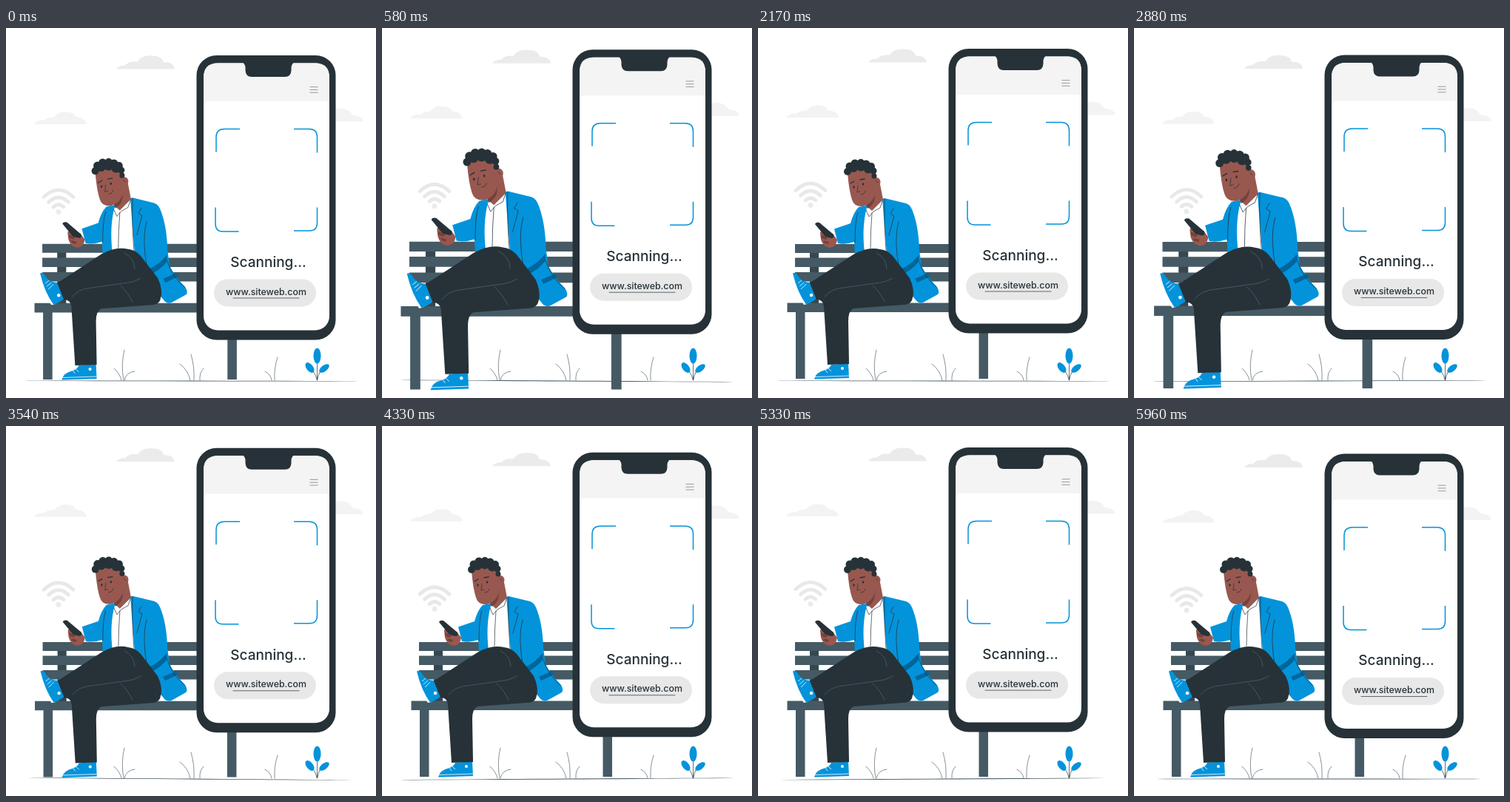
Recreate the animation shown at these times as an HTML page. Size 500x500 px, loop 6000 ms.

```html
<!DOCTYPE html>
<html lang="en">
<head>
<meta charset="utf-8">
<title>Scanning</title>
<style>
  html, body { margin: 0; width: 100%; height: 100%; overflow: hidden; background: #fff; }
  svg { display: block; width: 100%; height: 100%; }
  text { font-family: Inter, "Open Sans", sans-serif; font-weight: 500; fill: #263238; text-anchor: middle; }
  .dark { fill: #263238; }
  .blue { fill: #0393db; }
  .navy { fill: #01669b; }
  .bench { fill: #455a64; }
  .post { fill: #37474f; }
  .skin { fill: #985850; }
  .shade { fill: #74423a; }
  .white { fill: #fff; }
  .pale { fill: #ebebeb; }
  .faint { fill: #f3f3f3; }
  .line, .grass, .fold { fill: none; stroke: #263238; stroke-width: .7; stroke-linecap: round; }
  .grass { stroke: #56646b; }
  .fold { stroke: #56646b; }
</style>
</head>
<body>
<svg viewBox="0 0 500 500">
  <!-- sky -->
  <g class="float">
    <path class="pale" d="M149 56Q152 51 161 51Q166 45 178 46Q183 37 197 38Q211 38 213 47Q226 46 228 56Z"/>
    <g class="faint">
      <path d="M38 130.500Q41 125 52 125Q56 121 65 121Q71 113 82 114Q92 114 95 121Q107 121 109 130.500Z"/>
      <path d="M425 127Q428 121 437 119Q442 109 453 109Q464 110 468 118Q481 119 483 127Z"/>
    </g>
    <path d="M51 229Q71 210 91 229M57.500 236Q71 223 84.500 236M64 242.500Q71 236 78 242.500"
      fill="none" stroke="#e8e8e8" stroke-width="4.6" stroke-linecap="round"/>
    <circle class="pale" cx="71" cy="249" r="3.500"/>
  </g>

  <!-- ground -->
  <ellipse id="floor" cx="250" cy="477" rx="225" ry=".45" fill="#455a64"/>
  <g class="grass">
    <path d="M160 435Q155 455 159 476M146 460Q154 467 156 476M174 464Q162 465 160 476"/>
    <path d="M250 441Q255 458 254 476M235 454Q246 462 249 476M267 460Q261 466 262 476"/>
    <path d="M367 445Q362 460 363 476M350 464Q358 468 359 476"/>
  </g>
  <path class="line" d="M420.500 445V476M411 460Q418 465 420 475M430 459Q422 464 421 475"/>
  <g class="blue">
    <ellipse cx="420.500" cy="443" rx="5" ry="10.500"/>
    <ellipse cx="410.500" cy="459" rx="4.500" ry="8" transform="rotate(-38 410.500 459)"/>
    <ellipse cx="430" cy="460" rx="4" ry="8" transform="rotate(52 430 460)"/>
  </g>

  <!-- bench and sitter -->
  <g id="sitter">
    <path class="post" d="M70 298h12v78h-12zM297 298h12v78h-12z"/>
    <path class="bench" d="M50 292H316v12H50zM50 310.500H316v12.500H50zM50 330H316v12.500H50z"/>
    <path class="bench" d="M39.500 371.500H325v12.500H39.500zM51 384h12.500v90h-12.500zM298.500 384h12.500v90h-12.500z"/>

    <!-- jacket and shirt -->
    <path class="blue" d="M146 240L136 242Q129 249 125 264L103 271.500L108 291Q118 293 130 289L131 306L160 312L192 345L212 366Q216 373 223 371L243 360Q246 357 242 350Q229 337 221 322L218 300Q217 266 208 245Q205 237 196 236L171 230Z"/>
    <path class="white" d="M147 243L168 230Q171 270 174 304L144 304Q140 268 147 243Z"/>
    <path class="line" d="M154 250Q152 275 152 299M146 246L150 255L156 248L165 243L169 231"/>
    <path class="line" d="M171 231Q170 265 173 301M183 244L179 251L184 254L177 280M135 249Q131 260 131 290M190 262Q183 285 191 327"/>
    <path class="navy" d="M191 327Q207 320 217 307L218 315Q208 327 195 333Z"/>
    <path class="navy" d="M212 339L230 331L232 336L215 344Z"/>
    <path class="line" d="M218 316Q224 336 241 350"/>

    <!-- head -->
    <path class="skin" d="M145 228L147 241L154 247L169 232L164 206L152 206Z"/>
    <path class="shade" d="M146 239Q155 235 158 225Q159 238 148 244Z"/>
    <path class="skin" d="M121 196Q123 220 127 232Q130 242 142 241Q154 238 158 224L157 188Q135 182 121 196Z"/>
    <ellipse class="skin" cx="160" cy="208" rx="5.500" ry="6"/>
    <g class="dark" id="hair"></g>
    <g class="dark">
      <ellipse cx="129.500" cy="215" rx="1.200" ry="1.700"/>
      <ellipse cx="142" cy="211" rx="1.200" ry="1.700"/>
    </g>
    <path class="line" d="M125 210L130 207M138 205L144 204" style="stroke-width: 1.300"/>
    <path class="line" d="M135 213L134 222L138 221M139 225Q144 225 145 220M159 206L162 209"/>

    <!-- hand and handset -->
    <path class="skin" d="M84 277Q84 273 90 275L101 278L107 286Q106 296 97 297Q88 296 85 286Z"/>
    <path class="dark" d="M77 265Q78 262 83 263L102 279Q104 284 99 284L91 282Z"/>
    <path class="shade" d="M85 279L94 283L92 286L86 284ZM88 287L96 289L95 292L90 291Z"/>

    <!-- far shoe -->
    <path class="white" d="M43.500 333L48 331L67 373L62 374Q49 357 43.500 333Z"/>
    <path class="blue" d="M47 331.500Q51 329 54 335Q60 344 71 344L81 364Q75 370 65 373.500Q53 357 47 331.500Z"/>
    <path d="M54 345L59 341M56 349L62 344M58 353L65 346" fill="none" stroke="#fff" stroke-width=".8"/>
    <circle class="white" cx="72" cy="361" r="2.200"/>

    <!-- near shoe -->
    <path class="blue" d="M99 455L122 453L123 473L76 474.500Q78 465 91 462Q97 460 99 455Z"/>
    <path d="M91 462L94 466M95 460L99 464M77 471.500L123 470" fill="none" stroke="#fff" stroke-width=".8"/>
    <circle class="white" cx="114" cy="460" r="2"/>

    <!-- trousers -->
    <path class="dark" d="M70 344.500L129 306Q148 295 165 299Q175 300 182 308L205 338Q213 355 208 368Q205 374 196 374L129 379Q122 382 122 396L123 454L94 455L89 376Q88 367 79 367Z"/>
    <path class="fold" d="M90 363Q99 352 115 351L158 345Q172 344 182 338M160 304Q174 311 174 325M155 348Q165 357 171 370"/>
  </g>

  <!-- handset on the right -->
  <g class="float">
    <rect class="dark" x="257.500" y="37.500" width="188" height="384.500" rx="27"/>
    <rect class="white" x="267" y="48" width="170" height="361" rx="19"/>
    <path d="M267 99.500V67Q267 48 286 48H418Q437 48 437 67V99.500Z" fill="#f4f4f4"/>
    <path class="dark" d="M318 46Q323 48 323.500 54V58Q324 66.500 332 66.500H377Q385 66.500 385.500 58V54Q386 48 391 46Z"/>
    <path d="M410.500 80.200H421.500M410.500 84H421.500M410.500 87.800H421.500" fill="none" stroke="#7b868b" stroke-width=".8"/>
    <path d="M284 168V148Q284 137 295 137H316M389 137H410Q420.500 137 420.500 148V169M420.500 243V264Q420.500 274.500 410 274.500H389M314.500 275.500H293Q283 275.500 283 265V243"
      fill="none" stroke="#0393db" stroke-width="1.500"/>
    <text x="354.500" y="323.500" font-size="19">Scanning...</text>
    <rect x="281" y="340" width="138" height="37" rx="18.500" fill="#e8e8e8"/>
    <text x="351.500" y="361.200" font-size="12.400">www.siteweb.com</text>
    <path class="line" d="M307 365.500H396"/>
  </g>
</svg>
<script>
  const LOOP = 6000, LEAD = 40;
  const floats = document.querySelectorAll(".float");
  const sitter = document.getElementById("sitter");
  const floor = document.getElementById("floor");

  // Curls as [x, y, radius]
  const curls = [[121, 194, 5], [124, 187, 5.5], [131, 183, 5.5], [139, 182, 5], [146, 184, 5.5],
    [153, 187, 5], [156, 193, 4.5], [157, 200, 3.5], [129, 189, 6], [139, 187, 6.5], [149, 190, 6.5]];
  document.getElementById("hair").innerHTML =
    curls.map(([x, y, r]) => `<circle cx="${x}" cy="${y}" r="${r}"/>`).join("");

  // Linear interpolation through [position, value] stops
  function track(stops, p) {
    const i = stops.findIndex(s => s[0] > p);
    const [a, b] = [stops[i - 1], stops[i]];
    return a[1] + (b[1] - a[1]) * (p - a[0]) / (b[0] - a[0]);
  }
  const bob = [[0, 0], [.5, -10], [1, 0]];
  const sway = [[0, 0], [.25, 1], [.75, -1], [1, 0]];
  const beat = [[0, 1], [.1, 1.1], [.3, 1], [.4, 1], [.5, 1.1], [.6, 1], [1, 1]];

  const start = performance.now();
  function draw() {
    const t = (performance.now() - start + LEAD) % LOOP;
    const p = t % 1500 / 1500;
    floats.forEach(g => g.setAttribute("transform", `translate(0 ${track(bob, p)})`));
    floor.setAttribute("transform", `rotate(${track(sway, p)} 250 477)`);
    sitter.setAttribute("transform",
      `translate(182.5 325.5) scale(${track(beat, t / LOOP)}) translate(-182.5 -325.5)`);
    requestAnimationFrame(draw);
  }
  draw();
</script>
</body>
</html>
```
